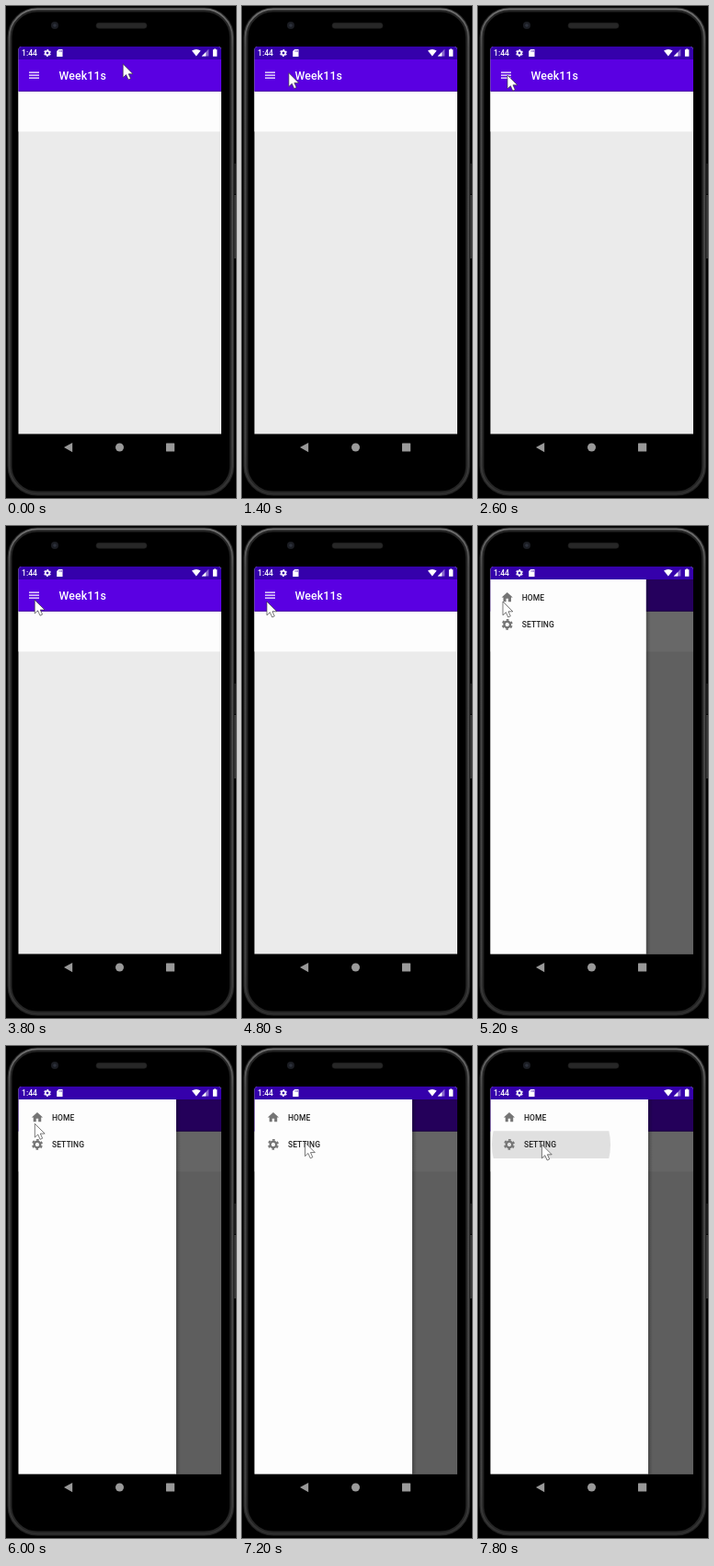
An HTML page that plays this animation: 250x534 px, repeating every 8 s.

```html
<!DOCTYPE html>
<html lang="en">
<head>
<meta charset="utf-8">
<title>App drawer</title>
<style>
  html, body { margin: 0; width: 100%; height: 100%; overflow: hidden; background: #000; }
  svg { display: block; width: 100%; height: 100%; }
  text { font-family: Roboto, Arial, sans-serif; font-weight: 500; }
</style>
</head>
<body>
<svg viewBox="0 0 250 534">
  <defs>
    <clipPath id="screen"><path d="M13.5 464.5V47.5q0-3.5 3.5-3.5H230.5q3.5 0 3.5 3.5V464.5z"/></clipPath>
    <clipPath id="row"><rect x="13.5" y="92.3" width="171.5" height="29.6"/></clipPath>
    <linearGradient id="shade">
      <stop offset="0" stop-opacity=".25"/>
      <stop offset="1" stop-opacity="0"/>
    </linearGradient>
    <linearGradient id="rim" x2="0" y2="1">
      <stop offset="0" stop-color="#707070"/>
      <stop offset=".08" stop-color="#4c4c4c"/>
      <stop offset=".9" stop-color="#444"/>
      <stop offset="1" stop-color="#303030"/>
    </linearGradient>
    <g id="gear" fill="none" stroke="currentColor">
      <circle r="5.4" stroke-width="3.8"/>
      <circle r="8.3" stroke-width="3" pathLength="6" stroke-dasharray=".5 .5" stroke-dashoffset="-.25"/>
    </g>
  </defs>

  <!-- phone body -->
  <rect width="250" height="534"/>
  <rect x="248" y="171" width="2" height="33" fill="#1c1c1c"/>
  <rect x="248" y="205" width="2" height="69" fill="#383838"/>
  <g fill="none">
    <rect x="4" y="4" width="241.6" height="525" rx="30" stroke="#242424" stroke-width="5"/>
    <rect x="3.6" y="3.4" width="242.4" height="526" rx="30.5" stroke="url(#rim)" stroke-width="1.8"/>
  </g>
  <circle cx="53" cy="21" r="4" fill="#1b1d23"/>
  <circle cx="53" cy="21" r="1.8" fill="#2d323c"/>
  <rect x="98" y="18.3" width="55" height="6" rx="3" fill="#272727" stroke="#1e1e1e" stroke-width=".6"/>

  <g clip-path="url(#screen)">
    <rect x="13" y="44" width="222" height="421" fill="#ebebeb"/>
    <rect x="13" y="92" width="222" height="44.3" fill="#fdfdfd"/>
    <rect x="13" y="58" width="222" height="34.2" fill="#5a00e2"/>
    <rect x="13" y="91.8" width="222" height="1" fill="#3d009c"/>
    <path d="M25 72h11m-11 3h11m-11 3h11" stroke="#fff" stroke-width="1.25"/>
    <text x="57.4" y="79.7" font-size="12.3" letter-spacing=".16" fill="#fff">Week11s</text>

    <rect id="scrim" x="13" y="58" width="222" height="407" opacity="0"/>
    <g id="drawer">
      <rect x="185" y="58" width="5" height="407" fill="url(#shade)"/>
      <rect x="13.5" y="58" width="171.5" height="407" fill="#fdfdfd"/>
      <circle id="ripple" cx="79.5" cy="107" r="64.5" fill="#e0e0e0" clip-path="url(#row)"/>
      <g color="#757575">
        <path d="M10 20v-6h4v6h5v-8h3L12 3 2 12h3v8z" fill="currentColor" transform="translate(26.7 70.2) scale(.607)"/>
        <use href="#gear" transform="translate(34 106.9) scale(.607)"/>
      </g>
      <g font-size="8.5" letter-spacing=".05" fill="#222">
        <text x="50" y="80.8">HOME</text>
        <text x="50" y="110">SETTING</text>
      </g>
    </g>

    <!-- status bar -->
    <rect x="13" y="44" width="222" height="14" fill="#3500ab"/>
    <g fill="#fff" color="#fff">
      <text x="17" y="54.1" font-size="8.6">1:44</text>
      <use href="#gear" transform="translate(45 51) scale(.4)"/>
      <path d="M57.2 47h4.3v8h-6.3v-6z"/>
      <path d="M58 48.2v1.5m1.3-1.5v1.5m1.2-1.5v1.5" stroke="#3500ab" stroke-width=".6"/>
      <path d="M202 48.6q4.8-3.4 9.6 0L206.8 54.6z"/>
      <path d="M220.3 46.8v7.8h-7.6z" opacity=".4"/>
      <path d="M217.3 49.9v4.7h-4.6z"/>
      <path d="M226.2 46.5h1.9v.8h1.3v7.5h-4.5v-7.5h1.3z"/>
    </g>
  </g>

  <!-- navigation -->
  <g fill="#999">
    <path d="M72.2 474v10.2L63 479.1z"/>
    <circle cx="123.5" cy="479" r="4.5"/>
    <rect x="174" y="474.4" width="9.2" height="9.2" rx=".5"/>
  </g>

  <path id="cursor" d="M0 0V14.8L3.4 11.7 5.8 17 8.3 15.9 6 10.8H10.8Z" fill="#fff" stroke="#333" stroke-width=".65" stroke-linejoin="round"/>
</svg>
<script>
  const LOOP = 8000, STEP = 200, DRAWER = 171.5;
  const $ = id => document.getElementById(id);
  const clamp = v => Math.min(1, Math.max(0, v));

  // pointer stops: time, x, y
  const stops = [
    [0, 127.2, 62.9], [400, 127.2, 62.9], [1800, 32, 75], [3600, 32, 75],
    [4200, 29, 95], [4600, 27, 82], [5800, 27, 82], [6800, 68.5, 104.5],
    [7200, 68.5, 104.8], [7600, 69.4, 107], [LOOP, 69.4, 107]
  ];

  function pointer(t) {
    const i = stops.findIndex(s => s[0] > t);
    const [t0, x0, y0] = stops[i - 1], [t1, x1, y1] = stops[i];
    const u = (t - t0) / (t1 - t0), e = u * u * (3 - 2 * u);
    return [x0 + (x1 - x0) * e, y0 + (y1 - y0) * e];
  }

  function draw(now) {
    const t = Math.floor(now % LOOP / STEP) * STEP;
    const open = 1 - (1 - clamp((t - 4904) / 510)) ** 5;
    $("drawer").setAttribute("transform", `translate(${(open - 1) * DRAWER})`);
    $("drawer").setAttribute("visibility", open ? "visible" : "hidden");
    $("scrim").setAttribute("opacity", .6 * open ** 1.35);
    $("ripple").setAttribute("opacity", t >= 7800 ? 1 : 0);
    $("cursor").setAttribute("transform", `translate(${pointer(t)})`);
  }

  const start = performance.now();
  function tick() {
    draw(performance.now() - start);
    requestAnimationFrame(tick);
  }
  tick();
</script>
</body>
</html>
```
